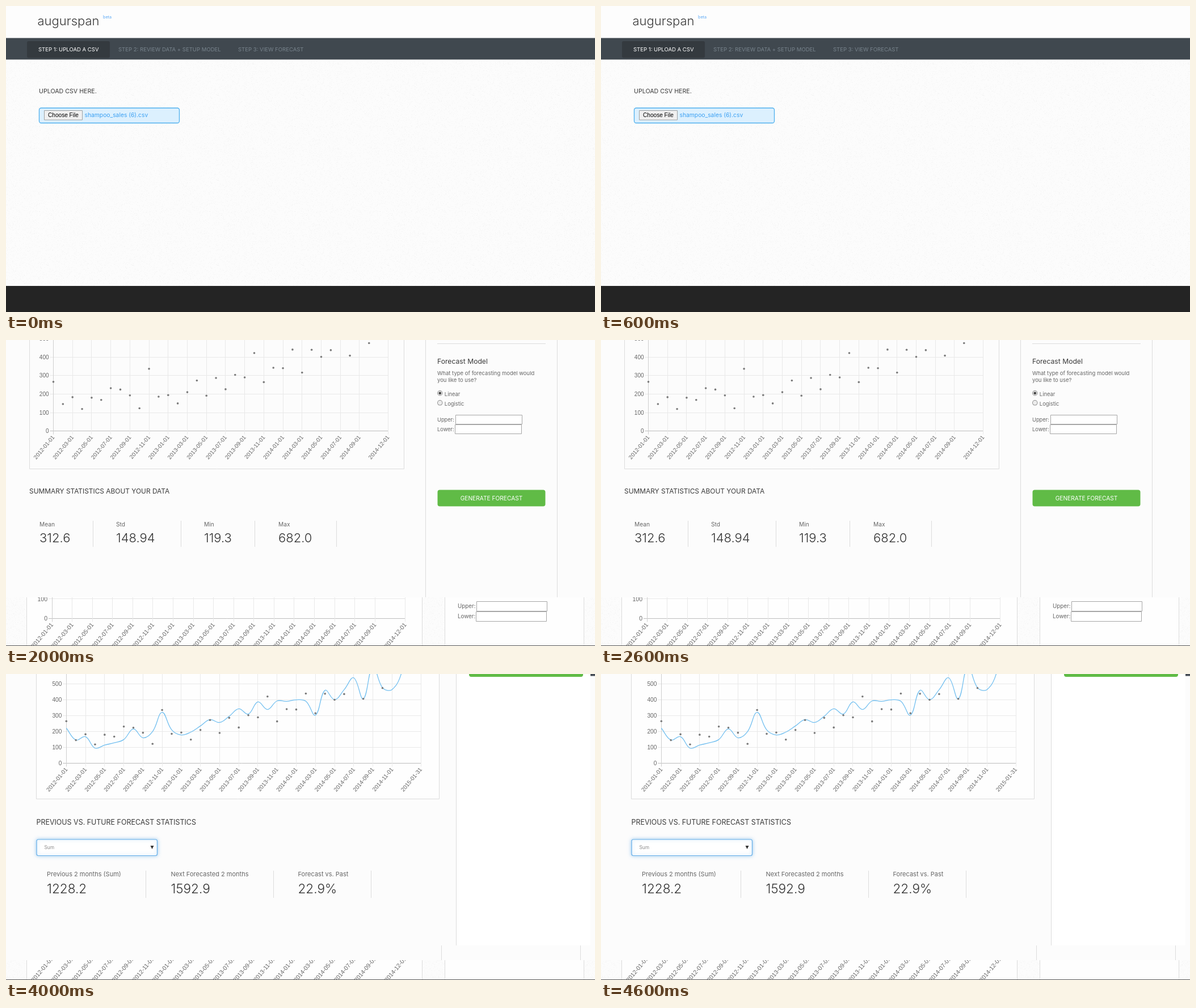
Animation, 1038 px wide and 540 px high, one loop 5 s. Source, as an HTML page with a canvas:

```html
<!DOCTYPE html>
<html lang="en">
<head>
<meta charset="utf-8">
<title>Forecast walkthrough</title>
<style>
  html, body { margin: 0; width: 100%; height: 100%; overflow: hidden; background: #fcfcfc; }
  canvas { display: block; }
</style>
</head>
<body>
<canvas id="stage" width="1038" height="540"></canvas>
<script>
const ctx = document.getElementById('stage').getContext('2d');
const W = 1038, H = 540;
const UI = 'Inter, "Open Sans", sans-serif';
const ARIAL = '"Liberation Sans", Arial, sans-serif';
const BLUE = '#3ba0f3', GREEN = '#60bb46', INK = '#3a3a3a', SOFT = '#666', RULE = '#dcdcdc', PAPER = '#fcfcfc';

const actuals = [266, 145.9, 183.1, 119.3, 180.3, 168.5, 231.8, 224.5, 192.8, 122.9, 336.5, 185.9,
  194.3, 149.5, 210.1, 273.3, 191.4, 287, 226, 303.6, 289.9, 421.6, 264.5, 342.3,
  339.7, 440.4, 315.9, 439.3, 401.3, 437.4, 575.5, 407.6, 682, 475.3, 581.3, 646.9];
const forecast = [222, 147, 168, 95, 115, 129, 150, 217, 161, 200, 322, 211,
  179, 197, 236, 276, 258, 297, 344, 311, 388, 340, 394, 391,
  401, 392, 304, 461, 402, 465, 540, 407, 616, 478, 466, 574, 887, 709];

// Drawing helpers
const crisp = v => Math.floor(v) + 0.5;

function text(str, x, y, size, color = INK, { weight = 400, align = 'left', font = UI } = {}) {
  ctx.font = `${weight} ${size}px ${font}`;
  ctx.textAlign = align;
  ctx.textBaseline = 'alphabetic';
  ctx.fillStyle = color;
  ctx.fillText(str, x, y);
  return x + ctx.measureText(str).width;
}

function fill(x, y, w, h, color) {
  ctx.fillStyle = color;
  ctx.fillRect(x, y, w, h);
}

function box(x, y, w, h, { bg, border, radius = 0, line = 1 } = {}) {
  ctx.beginPath();
  ctx.roundRect(x, y, w, h, radius);
  if (bg) { ctx.fillStyle = bg; ctx.fill(); }
  if (border) { ctx.strokeStyle = border; ctx.lineWidth = line; ctx.stroke(); }
}

function input(x, y, w, h) {
  box(crisp(x), crisp(y), Math.floor(w), Math.floor(h), { bg: '#fff', border: '#a6a6a6' });
}

function segment(x1, y1, x2, y2, color = RULE, width = 1) {
  ctx.beginPath();
  ctx.moveTo(x1, y1);
  ctx.lineTo(x2, y2);
  ctx.strokeStyle = color;
  ctx.lineWidth = width;
  ctx.stroke();
}

function dot(x, y, r, color) {
  ctx.beginPath();
  ctx.arc(x, y, r, 0, 7);
  ctx.fillStyle = color;
  ctx.fill();
}

function polygon(points, color) {
  ctx.beginPath();
  points.forEach(([x, y]) => ctx.lineTo(x, y));
  ctx.fillStyle = color;
  ctx.fill();
}

const arrow = (x, y, color) => polygon([[x - 3, y - 3], [x + 3, y - 3], [x, y + 3]], color);

function button(label, x, y, w, h, size, baseline) {
  box(x, y, w, h, { bg: GREEN, radius: 4 });
  text(label, x + w / 2, baseline, size, '#fff', { align: 'center' });
}

function radio(x, y, r, on) {
  dot(x, y, r, '#8f8f8f');
  dot(x, y, r - 1, '#ececec');
  if (on) dot(x, y, r * 0.5, '#444');
}

// Faint paper grain
const grain = (() => {
  const tile = document.createElement('canvas');
  tile.width = tile.height = 150;
  const g = tile.getContext('2d');
  let seed = 7;
  const random = () => (seed = seed * 16807 % 2147483647) / 2147483647;
  g.fillStyle = 'rgba(0,0,0,.02)';
  for (let i = 0; i < 3000; i++) g.fillRect(random() * 150 | 0, random() * 150 | 0, 1, 1);
  return ctx.createPattern(tile, 'repeat');
})();

// Charts
function curve(points, color) {
  const tension = 0.4, last = points.length - 1;
  const handles = points.map(([x, y], i) => {
    const [px, py] = points[Math.max(i - 1, 0)], [nx, ny] = points[Math.min(i + 1, last)];
    const before = Math.hypot(x - px, y - py), after = Math.hypot(nx - x, ny - y);
    const a = tension * before / (before + after), b = tension * after / (before + after);
    return [x - a * (nx - px), y - a * (ny - py), x + b * (nx - px), y + b * (ny - py)];
  });
  ctx.beginPath();
  ctx.moveTo(...points[0]);
  for (let i = 1; i <= last; i++) {
    ctx.bezierCurveTo(handles[i - 1][2], handles[i - 1][3], handles[i][0], handles[i][1], ...points[i]);
  }
  ctx.strokeStyle = color;
  ctx.lineWidth = 1.3;
  ctx.stroke();
}

function chart({ left, right, zero, per100, max, size, count, lastLabel, withForecast }) {
  const px = i => left + (right - left) * i / (count - 1);
  const py = v => zero - v / 100 * per100;

  for (let v = 0; v <= max; v += 100) {
    const y = crisp(py(v));
    segment(left - 6, y, right, y, v ? '#e9e9e9' : '#bdbdbd');
    text(v, left - 8, py(v) + size * 0.35, size, '#666', { align: 'right', font: ARIAL });
  }
  for (let i = 0; i < count; i++) {
    const isLast = i === count - 1;
    if (!isLast && (i % 2 || i >= count - 2)) continue;
    const x = crisp(px(i));
    segment(x, py(max), x, zero + 6, i ? '#e9e9e9' : '#cfcfcf');
    const month = String(i % 12 + 1).padStart(2, '0');
    ctx.save();
    ctx.translate(px(i), zero + 9);
    ctx.rotate(-50 * Math.PI / 180);
    text(isLast ? lastLabel : `${2012 + Math.floor(i / 12)}-${month}-01`, 0, size * 0.35, size, '#666',
      { align: 'right', font: ARIAL });
    ctx.restore();
  }
  if (withForecast) curve(forecast.map((v, i) => [px(i), py(v)]), '#74c0f0');
  actuals.forEach((v, i) => dot(px(i), py(v), 1.8, '#7a7a7a'));
}

const actualsChart = place => chart({ max: 700, count: 36, lastLabel: '2014-12-01', ...place });
const forecastChart = place => chart({
  max: 900, count: 38, lastLabel: '2015-01-31', per100: 27.92, size: 10.1, withForecast: true, ...place
});

function legend(label, x, y, bg, border) {
  box(x, y, 33, 10, { bg, border });
  text(label, x + 38, y + 8.5, 9.8, '#666', { font: ARIAL });
}

// Shared page parts
function header({ titleX, titleSize, baseline, betaX, top, bottom, tabSize, tabs, active, pill }) {
  fill(0, 0, W, top, '#fdfdfd');
  text('augurspan', titleX, baseline, titleSize, '#3c3c3c', { weight: 300 });
  text('beta', betaX, baseline - 12, 7.2, '#5aa8f5');
  fill(0, top, W, bottom - top, '#40484f');
  box(...pill, { bg: '#343a3f', radius: 3 });
  ['STEP 1: UPLOAD A CSV', 'STEP 2: REVIEW DATA + SETUP MODEL', 'STEP 3: VIEW FORECAST'].forEach((label, i) => {
    const on = i === active;
    text(label, tabs[i], (top + bottom) / 2 + 4.5 - on * 0.5, tabSize, on ? '#fff' : '#78848d');
  });
}

function modelForm(x, y, k) {
  const at = (str, dx, dy, size) => text(str, x + dx * k, y + dy * k, size * k, SOFT);
  text('Forecast Model', x, y, 12.8 * k);
  at('What type of forecasting model would', 0, 21.5, 10);
  at('you like to use?', 0, 34, 10);
  radio(x + 5 * k, y + 55 * k, 5 * k, true);
  at('Linear', 13.5, 60.5, 9.9);
  radio(x + 5 * k, y + 73 * k, 5 * k, false);
  at('Logistic', 13.5, 78.5, 9.9);
  at('Upper:', 0, 107.5, 9.8);
  at('Lower:', 0, 125.5, 9.8);
  input(x + 33.9 * k, y + 96 * k, 124 * k, 17.5 * k);
  input(x + 32.9 * k, y + 114 * k, 124 * k, 17.5 * k);
}

function stats(items, { label, value, labelSize, valueSize, top, bottom }) {
  for (const [name, number, x, divider] of items) {
    text(name, x, label, labelSize, SOFT);
    text(number, x, value, valueSize, '#333', { weight: 300 });
    segment(crisp(divider), top, crisp(divider), bottom);
  }
}

// Screens
function uploadScreen() {
  fill(0, 0, W, H, PAPER);
  fill(0, 95, W, 399, grain);
  header({
    titleX: 55.5, titleSize: 22, baseline: 34, betaX: 171, top: 56.5, bottom: 94.5,
    tabSize: 9.55, tabs: [57, 198, 409], active: 0, pill: [37, 62, 146, 29.5]
  });
  text('UPLOAD CSV HERE.', 58, 153.5, 10.65);
  box(58.5, 180, 247, 26.5, { bg: '#dcf0fe', border: '#4fb0ee', radius: 3.5, line: 1.3 });
  box(67.5, 184.5, 67, 16.5, { bg: '#f0f0f0', border: '#a0a0a0' });
  text('Choose File', 74, 196.3, 10.1, '#000', { font: ARIAL });
  text('shampoo_sales (6).csv', 138.5, 196.3, 10.3, BLUE);
  fill(0, 494, W, 46, '#242424');
}

function reviewScreen() {
  fill(0, 0, W, H, PAPER);
  fill(0, 97, W, 443, grain);
  header({
    titleX: 55, titleSize: 22.4, baseline: 35.5, betaX: 172.5, top: 58.5, bottom: 97.5,
    tabSize: 9.75, tabs: [49, 193.5, 416], active: 1, pill: [173, 64, 227, 30]
  });
  text('REVIEW DATA: PRE-FORECAST', 36, 130.7, 21.7);
  text('Sales of shampoo over a three year period trended', 36, 177, 12.8);

  box(36.5, 214.5, 697, 400, { bg: '#fefefe', border: RULE });
  legend('Actuals', 338, 231, '#808080', '#777');
  actualsChart({ left: 81, right: 703.5, zero: 491.5, per100: 34.65, size: 10.5 });

  box(773.5, 97.5, 245, 500, { bg: '#fefefe', border: RULE });
  const nodes = [[801, 145.5], [815, 134], [828.5, 142], [842.5, 128]];
  nodes.slice(1).forEach((p, i) => segment(...nodes[i], ...p, i < 2 ? '#0caaf0' : '#4cc6f6', 3));
  nodes.forEach((p, i) => dot(...p, 4.5, i < 3 ? '#0caaf0' : '#4cc6f6'));
  text('SETUP BASIC', 860, 134.8, 16.1);
  text('FORECAST', 860, 151, 16.1);
  segment(796, 182.5, 997, 182.5);
  text('Forecast Length', 796, 219, 12.3, '#222', { weight: 600 });
  let x = text('How many ', 796, 240, 10, SOFT);
  x = text('months', x, 240, 10, '#333', { weight: 700 });
  text(' do you want to', x, 240, 10, SOFT);
  text('forecast out?', 796, 252.5, 10, SOFT);
  input(796, 265, 123, 17);
  text('2', 797.5, 277.3, 9.5, '#444');
  segment(796, 329.5, 997, 329.5);
  modelForm(796, 365.5, 1);
  fill(0, 539, W, 1, '#555');
}

function summaryScreen() {
  fill(0, 0, W, H, PAPER);
  box(41.5, -200, 660, 427.5, { border: RULE });
  actualsChart({ left: 83.5, right: 673.5, zero: 160.7, per100: 32.65, size: 10 });
  text('SUMMARY STATISTICS ABOUT YOUR DATA', 41, 270.5, 11.9);
  stats([
    ['Mean', '312.6', 59, 153], ['Std', '148.94', 194, 308],
    ['Min', '119.3', 349, 438], ['Max', '682.0', 480, 582]
  ], { label: 329, value: 357, labelSize: 10.2, valueSize: 22, top: 319, bottom: 365 });
  box(739.5, -10, 232, 600, { border: RULE });
  segment(760, 6.5, 951, 6.5);
  modelForm(760, 41.5, 0.95);
  button('GENERATE FORECAST', 760.5, 264.5, 190, 29, 10.2, 283);
}

function forecastScreen() {
  fill(0, 0, W, H, PAPER);
  fill(0, 0, W, 3.5, '#454b54');
  text('FORECAST', 27.5, 55.3, 21.5);
  text('Sales of shampoo over a three year period trended', 27.5, 83, 12.8);
  box(531, 31.5, 144, 33, { border: BLUE, radius: 4, line: 1.2 });
  text('EXPORT FORECAST CSV', 603, 52, 10.7, BLUE, { align: 'center' });
  box(684, 31.5, 52, 33, { border: GREEN, radius: 4, line: 1.2 });
  text('RESET', 710, 52, 10.7, GREEN, { align: 'center' });

  box(27.5, 121.5, 709.5, 353, { border: RULE });
  legend('Forecast', 297, 142, '#d5ebfa', '#7cc3f0');
  legend('Actuals', 380.5, 142, '#808080', '#777');
  forecastChart({ left: 80, right: 704, zero: 412 });

  segment(767.5, 3, 767.5, H);
  segment(1012.5, 3, 1012.5, H);
  polygon([[799, 34], [830, 34], [829, 37.5], [818.5, 47.5], [818.5, 57], [811.5, 60], [811.5, 47.5], [800, 37.5]],
    '#219df8');
  text('FILTERS', 841.5, 47, 16.1);
  segment(789, 84.5, 990, 84.5);
  text('GROWTH (?)', 789, 117.5, 10.7, BLUE);
  text('FORECAST LENGTH:', 796.5, 142, 8, '#666');
  text('2', 796.5, 154, 9, '#555');
  segment(789, 158.5, 990, 158.5, '#cfcfcf');
  box(789, 177, 201.5, 24.5, { bg: '#e6edf0', radius: 3 });
  text('FORECAST MODEL TYPE', 793, 192, 8.1, '#84919a');
  arrow(982, 188.5, '#667580');
  button('UPDATE CHART', 789, 228, 201.5, 31.5, 10.7, 247.5);
}

function comparisonScreen() {
  fill(0, 0, W, H, PAPER);
  box(53.5, -200, 710, 420.5, { bg: '#fefefe', border: RULE });
  forecastChart({ left: 106.3, right: 731, zero: 157.5 });
  box(793.5, -10, 300, 600, { bg: '#fff', border: RULE });
  box(816, -26, 201, 31, { bg: GREEN, radius: 4 });
  text('PREVIOUS VS. FUTURE FORECAST STATISTICS', 53.5, 265.7, 12.45);
  ctx.save();
  ctx.shadowColor = 'rgba(102,175,233,.6)';
  ctx.shadowBlur = 6;
  box(54, 292, 212.5, 28.5, { bg: '#fff', border: '#66afe9', radius: 3, line: 1.2 });
  ctx.restore();
  text('Sum', 67.5, 308.5, 8.4, '#888');
  arrow(257.5, 306, '#333');
  stats([
    ['Previous 2 months (Sum)', '1228.2', 72, 246],
    ['Next Forecasted 2 months', '1592.9', 290.5, 471],
    ['Forecast vs. Past', '22.9%', 514.5, 643]
  ], { label: 357, value: 387, labelSize: 11, valueSize: 22.6, top: 347, bottom: 395 });
}

// Each screen covers only its own area; earlier ones stay visible beyond it.
const screens = [
  [uploadScreen, W, H], [reviewScreen, W, H], [summaryScreen, W, 454],
  [forecastScreen, W, 505], [comparisonScreen, 1030, 479]
];

function render() {
  const current = Math.floor(performance.now() / 1000) % screens.length;
  for (const [draw, width, height] of screens.slice(0, current + 1)) {
    ctx.save();
    ctx.beginPath();
    ctx.rect(0, 0, width, height);
    ctx.clip();
    draw();
    ctx.restore();
  }
  requestAnimationFrame(render);
}
render();
</script>
</body>
</html>
```
